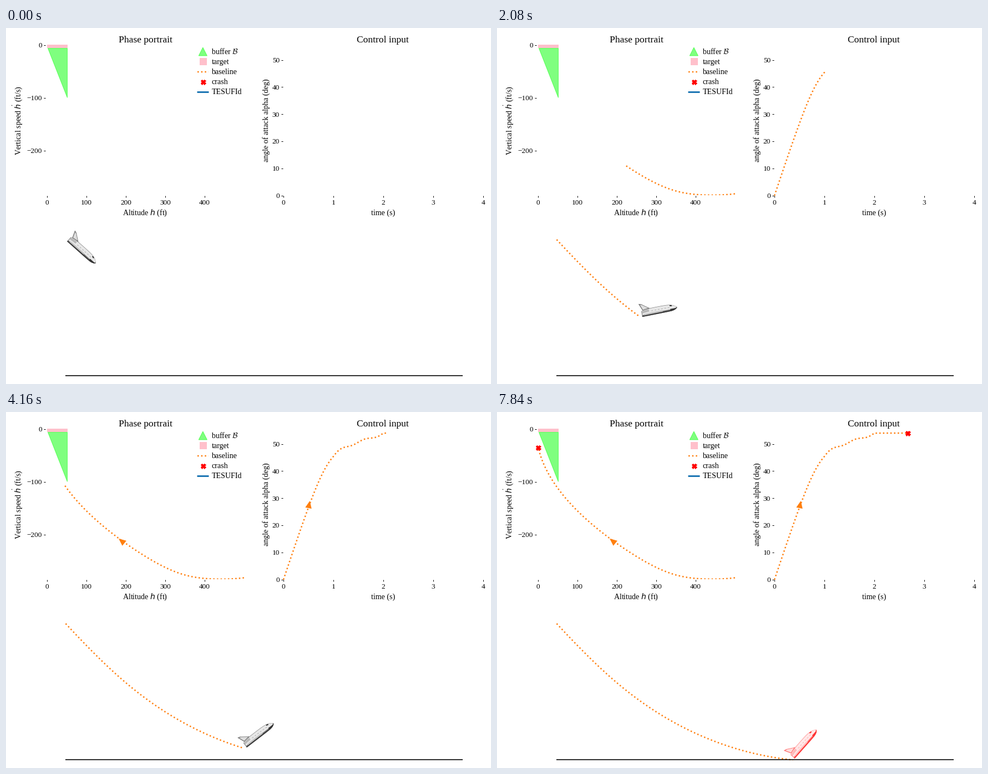
Write a matplotlib script that moves like this. It is 874x641 px and loops after 8000 ms.

```python
import numpy as np
import matplotlib.pyplot as plt
from matplotlib.animation import FuncAnimation
from matplotlib.patches import Polygon, Rectangle

W, H, DPI = 874, 641, 100
PT = 72 / DPI                      # points per pixel
ORANGE, BLUE = "#ff7f0e", "#1f77b4"
FRAMES, STEP_MS = 200, 40
DT, T_END = 0.02, 2.667            # simulated seconds
ARROW_FRAME, CRASH_FRAME = 60, 136
GROUND, FT = 626.5, 0.491          # ground level and pixels per foot

plt.rcParams["font.family"] = "Liberation Serif"
fig = plt.figure(figsize=(W / DPI, H / DPI), dpi=DPI, facecolor="white")
ax = fig.add_axes([0, 0, 1, 1])
ax.set_xlim(0, W)
ax.set_ylim(H, 0)
ax.axis("off")


def text(x, y, s, px=14, ha="center", **kw):
    ax.text(x, y, s, fontsize=px * PT, ha=ha, va="baseline", **kw)


def line(xs, ys, color="black", px=1.0, style="-", **kw):
    return ax.plot(xs, ys, color=color, lw=px * PT, ls=style,
                   solid_capstyle="butt", dash_capstyle="butt", **kw)[0]


def shape(points, color, **kw):
    return ax.add_patch(Polygon(points, closed=True, fc=color, lw=0, **kw))


def buffer(points):
    ax.add_patch(Polygon(points, fc="lime", ec="lime", alpha=0.5, lw=PT))


def pink_box(x, y, w, h):
    ax.add_patch(Rectangle((x, y), w, h, fc="pink", lw=0))


def cross(x, y):
    return ax.plot([x], [y], "X", color="red", ms=9 * PT, mew=PT, zorder=6)[0]


def phase_xy(h, v):
    return 74.3 + 0.709 * h, 30 - 0.951 * v


def control_xy(t, a):
    return 500 + 90 * t, 301.5 - 4.88 * a


def softplus(x, width):
    return width * np.logaddexp(0, x / width)


# ---- flight model ----
t = np.append(np.arange(0, T_END, DT), T_END)
# a steep glide that turns into a steady flare
speed = -287 + 4.5 * np.exp(-t / 0.15) + 117 * softplus(t - 0.52, 0.12)
drop = np.append(0, np.cumsum((speed[1:] + speed[:-1]) / 2 * np.diff(t)))
height = 500 * (1 - drop / drop[-1])
# the input climbs, levels off near 50, then creeps to its limit
creep = np.clip(t - 1, 0, 1)
alpha = 50 - softplus(50 - 55 * t, 9.8) + 4 * creep**2 + 0.4 * np.sin(4 * np.pi * creep)
path_x = 107.5 + t * (130.5 + 15.2 * t - 1.6 * t**2)
path_y = GROUND - FT * height
glide = np.arctan2(FT * speed, np.gradient(path_x, t))
pitch = glide + np.radians(alpha + 5 * np.exp(-t / 0.2))

# ---- phase portrait ----
text(251, 25.5, "Phase portrait", 17.5)
text(251, 337, "Altitude $h$ (ft)")
text(28, 166, r"Vertical speed $\dot{h}$ (ft/s)", rotation=90, rotation_mode="anchor")
for h in range(0, 500, 100):
    x = phase_xy(h, 0)[0]
    line([x, x], [301.5, 304.5])
    text(x, 317.5, str(h), 13.3)
for v in (0, -100, -200):
    y = phase_xy(0, v)[1] + 0.5
    line([68, 71], [y, y])
    text(65, y + 4.5, str(v).replace("-", "\u2212"), 13.3, "right")
buffer([(74.5, 36), (110, 36), (110, 124.5)])
pink_box(74, 29.5, 37, 6.5)

# ---- control input ----
text(679, 25.5, "Control input", 17.5)
text(679.5, 337, "time (s)")
text(472.5, 166.5, "angle of attack alpha (deg)", rotation=90, rotation_mode="anchor")
for s in range(5):
    x = control_xy(s, 0)[0]
    line([x, x], [301.5, 304.5])
    text(x, 317.5, str(s), 13.3)
for a in range(0, 60, 10):
    y = control_xy(0, a)[1]
    line([496, 499], [y, y])
    text(493, y + 4.5, str(a), 13.3, "right")

# ---- legend ----
buffer([(354.8, 35), (347.2, 50), (362.4, 50)])
pink_box(348.8, 54.4, 13, 13)
line([345, 364.5], [78.5, 78.5], ORANGE, 2.5, ":")
cross(354.8, 97)
line([344, 365], [114.8, 114.8], BLUE, 3)
labels = [r"buffer $\mathcal{B}$", "target", "baseline", "crash", "TESUFId"]
for i, label in enumerate(labels):
    text(370.5, 47 + 18 * i, label, 14, "left", math_fontfamily="cm")

# ---- ground and moving lines ----
line([107, 823], [626, 626], px=1.6, zorder=4)
tracks = [phase_xy(height, speed), control_xy(t, alpha), (path_x, path_y)]
lines = [line([], [], ORANGE, 2.5, ":", zorder=3) for _ in tracks]
lines[0].set_clip_path(Rectangle((71, 28), 357.5, 273, transform=ax.transData))


def arrow(tip, angle):
    d = np.array([np.cos(angle), -np.sin(angle)])
    side = 5.8 * np.array([-d[1], d[0]])
    base = np.array(tip) - 13.2 * d
    return shape([tip, base + side, base - side], ORANGE, zorder=4)


arrows = [arrow((203, 228), np.radians(141)), arrow((547.5, 160), np.radians(79))]
crashes = [cross(*phase_xy(0, speed[-1])), cross(*control_xy(T_END, alpha[-1]))]


# ---- orbiter, nose along +u ----
def hull(u0, u1, low, high):
    """Slice of the fuselage between two fractions of its thickness."""
    u = np.linspace(u0, u1, 40)
    n = (u - 4) / 65
    belly = -0.7 + 5 * n**14
    roof = 12.3 - 3 * np.exp(-(u - 4) / 6) - 8 * n**9
    edges = [belly + f * (roof - belly) for f in (low, high)]
    return np.column_stack([np.append(u, u[::-1]), np.append(edges[0], edges[1][::-1])])


def inset(points, scale):
    p = np.array(points)
    return p.mean(0) + scale * (p - p.mean(0))


FIN = [(1.5, 23.5), (6.4, 22), (20.7, 11.5), (7, 9.5)]
# each part: outline, gray level
PARTS = [
    (FIN, 0.42),
    (inset(FIN, 0.72), 0.87),
    (hull(4, 69, 0, 1), 0.48),
    (hull(5, 67, 0.28, 0.95), 0.91),
    (hull(5, 18, 0.55, 0.9), 0.72),
    (hull(8, 42, 0.12, 0.36), 0.76),
    (hull(4, 69, 0, 0.16), 0.22),
    (hull(56, 69, 0, 0.35), 0.2),
    (hull(56, 60, 0.78, 0.95), 0.18),
] + [(hull(u, u + 3, 0.55, 0.62), 0.66) for u in range(22, 54, 6)]
craft = [shape(p, "white", zorder=5) for p, _ in PARTS]


def place_craft(i, crashed):
    c, s = np.cos(pitch[i]), np.sin(pitch[i])
    for patch, (points, gray) in zip(craft, PARTS):
        u, v = np.array(points).T
        patch.set_xy(np.column_stack([path_x[i] + c * u - s * v,
                                      path_y[i] - s * u - c * v]))
        patch.set_facecolor((1, gray, gray) if crashed else (gray,) * 3)


def draw(k):
    last = len(t) - 1
    for ln, (x, y) in zip(lines, tracks):
        ln.set_data(x[:k], y[:k])
    place_craft(min(k, last), k >= CRASH_FRAME)
    for a in arrows:
        a.set_visible(k >= ARROW_FRAME)
    for c in crashes:
        c.set_visible(k >= CRASH_FRAME)
    return lines + craft + arrows + crashes


anim = FuncAnimation(fig, draw, frames=FRAMES, interval=STEP_MS,
                     init_func=lambda: draw(0), repeat=True, repeat_delay=0)
plt.show()
```
